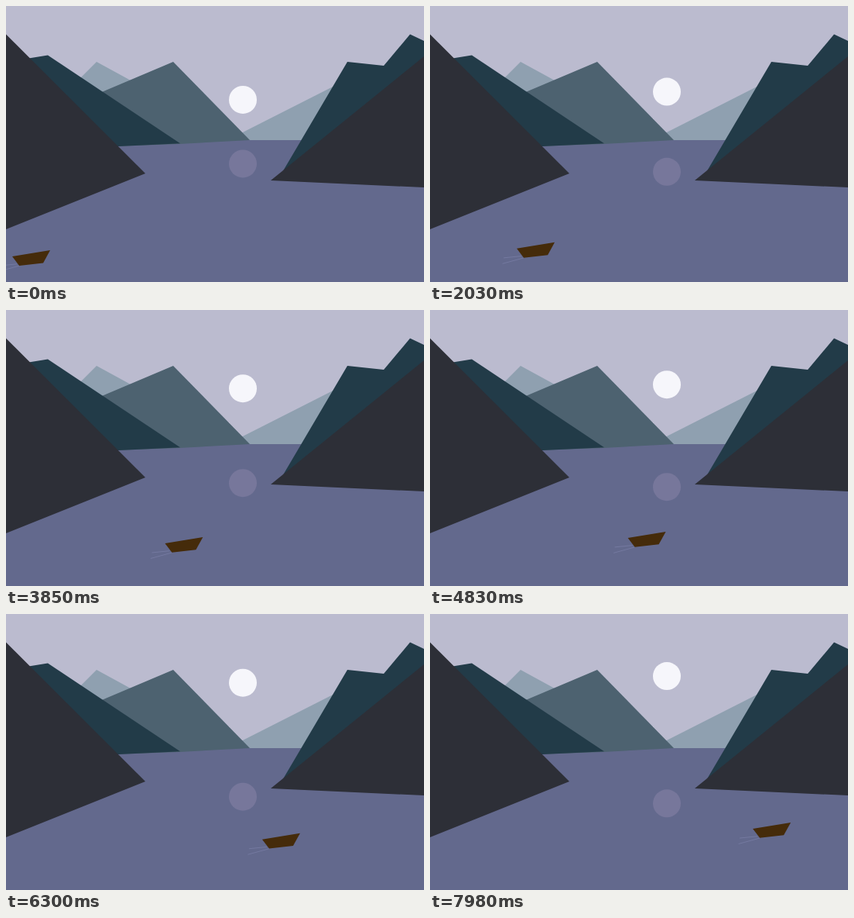
These frames come from a looping animation (540 by 356 pixels, 8 s). An HTML page:

```html
<!DOCTYPE html>
<html lang="en">
<head>
<meta charset="utf-8">
<title>Moonlit lake</title>
<style>
  html, body { margin: 0; width: 100%; height: 100%; overflow: hidden; background: #bbbbcf; }
  svg { display: block; width: 100%; height: 100%; }
</style>
</head>
<body>
<svg viewBox="0 0 540 356">
  <rect width="540" height="356" fill="#bbbbcf"/>
  <circle id="moon" cx="306" r="18" fill="#f6f6fb"/>
  <g fill="#8fa0b0">
    <path d="M60 129 117 72 240 139V173H60Z"/>
    <path d="M286 173 450 90V173Z"/>
  </g>
  <rect y="173" width="540" height="183" fill="#63698d"/>
  <circle id="reflection" cx="306" r="18" fill="#77779b"/>
  <path d="M100 121 216 72 315 173 224 178 140 181Z" fill="#4d6270"/>
  <g fill="#223b48">
    <path d="M20 69 54 63.5 225 177.3 140 181.3Z"/>
    <path d="M441 72 488 77 522 36.5 540 45V70L356 216Z"/>
  </g>
  <g fill="#2d2f37">
    <path d="M0 36.5 180 216 0 288Z"/>
    <path d="M342 225 540 65V234Z"/>
  </g>
  <g id="boat">
    <path d="M-18.500 27.500 9 20M-17 20 6 17.700" fill="none" stroke="#7479a0"/>
    <path d="M0 8 49 0 40 16.300 9 19.800Z" fill="#452b0a"/>
  </g>
</svg>
<script>
  const LOOP = 8000;
  const BOB = 2180;
  const [moon, reflection, boat] =
    ["moon", "reflection", "boat"].map(id => document.getElementById(id));

  function draw(t) {
    const rise = t * 0.00513;
    moon.setAttribute("cy", 121 - rise);
    reflection.setAttribute("cy", 203.4 + rise);

    const x = 8 + t * 0.05125;
    const bob = 4.3 * Math.cos((t - 2075) / BOB * 2 * Math.PI);
    const y = 311 - t * 0.00512 + bob;
    boat.setAttribute("transform", `translate(${x} ${y})`);
  }

  const start = performance.now();
  function tick() {
    draw((performance.now() - start) % LOOP);
    requestAnimationFrame(tick);
  }
  tick();
</script>
</body>
</html>
```
